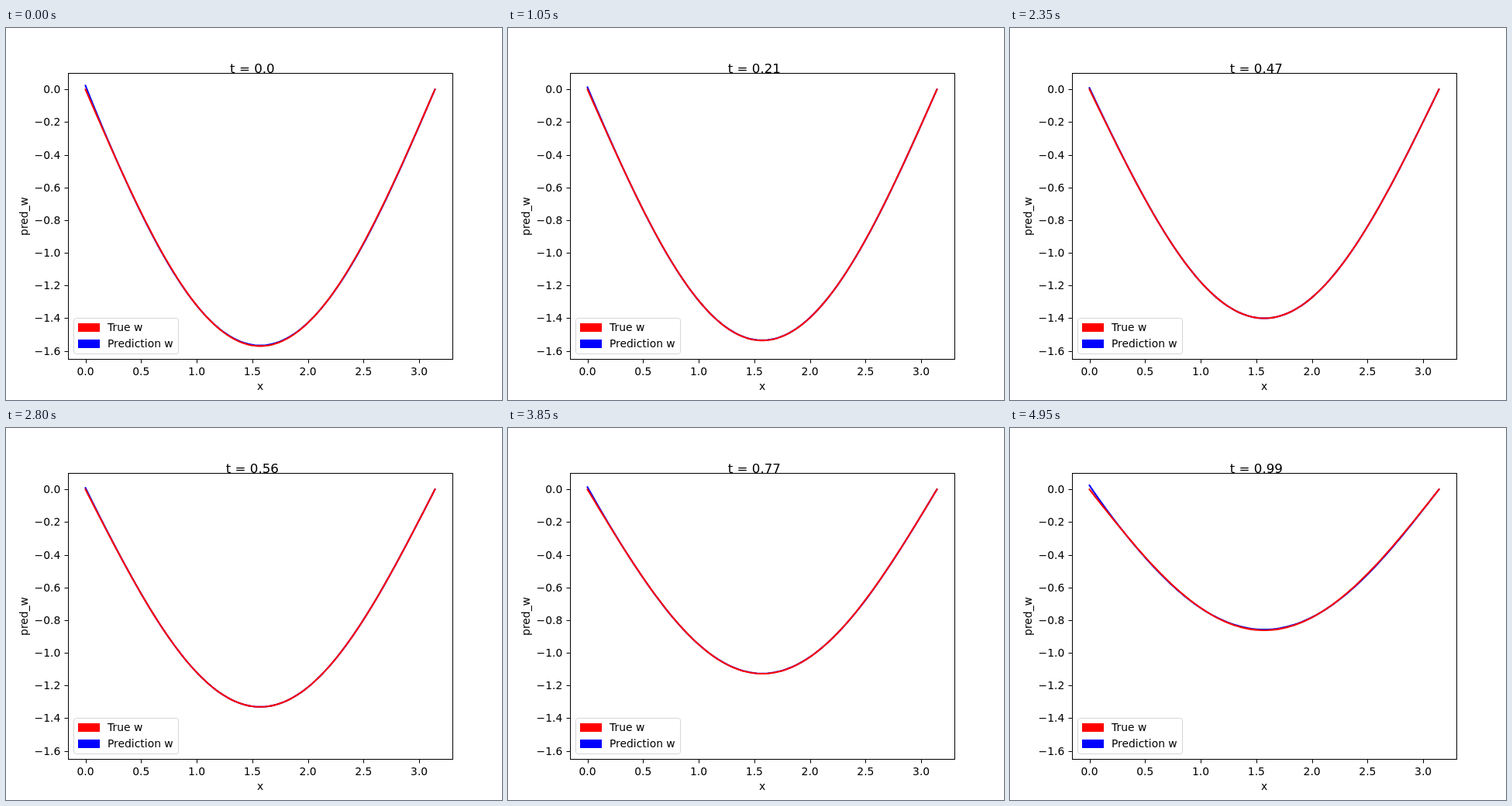
Write an HTML page with a canvas that moves like this. It is 640x480 px and loops after 5 s.

```html
<!DOCTYPE html>
<html lang="en">
<head>
<meta charset="utf-8">
<title>True and predicted w</title>
<style>
  html, body { margin: 0; width: 100%; height: 100%; overflow: hidden; background: #fff; }
  canvas { display: block; }
</style>
</head>
<body>
<canvas id="plot" width="640" height="480"></canvas>
<script>
const ctx = document.getElementById('plot').getContext('2d');
const STEP_MS = 50, STEPS = 100, POINTS = 100;
const SMALL = 13.89, LARGE = 16.67;
const RED = '#ff0000', BLUE = '#0000ff';

const px = x => 102.545 + x * 450.909 / Math.PI;
const py = y => 79.25 - y * 210.85;
const snap = v => Math.floor(v + 0.5) + 0.5;

const trueW = (x, t) => -Math.PI / 2 * Math.cos(t) * Math.sin(x);

// The fit is worst at x = 0 and near both ends of the time range.
function predictedW(x, t) {
  const spread = (t - 0.48) ** 2;
  const edge = (0.009 + 0.06 * spread) * Math.exp(-x / 0.17);
  const ripple = 0.018 * spread * Math.sin(3 * x);
  return trueW(x, t) + edge - ripple;
}

function text(str, x, y, size = SMALL, align = 'center') {
  ctx.font = `${size}px "DejaVu Sans", sans-serif`;
  ctx.textAlign = align;
  ctx.fillStyle = '#000';
  ctx.fillText(str, x, y);
}

function line(x1, y1, x2, y2) {
  ctx.beginPath();
  ctx.moveTo(x1, y1);
  ctx.lineTo(x2, y2);
  ctx.stroke();
}

function curve(f, t, color) {
  ctx.beginPath();
  for (let i = 0; i < POINTS; i++) {
    const x = Math.PI * i / (POINTS - 1);
    ctx.lineTo(px(x), py(f(x, t)));
  }
  ctx.strokeStyle = color;
  ctx.lineWidth = 2.08;
  ctx.lineCap = 'square';
  ctx.lineJoin = 'round';
  ctx.stroke();
}

function axes() {
  ctx.strokeStyle = '#000';
  ctx.lineWidth = 1;
  ctx.lineCap = 'butt';
  ctx.lineJoin = 'miter';
  ctx.strokeRect(80.5, 58.5, 496, 369);
  for (let i = 0; i <= 6; i++) {
    const x = px(i / 2);
    line(snap(x), 428, snap(x), 432.5);
    text((i / 2).toFixed(1), x, 448);
  }
  for (let i = 0; i <= 8; i++) {
    const y = py(-i / 5);
    line(75.5, snap(y), 80, snap(y));
    text((i ? '\u2212' : '') + (i / 5).toFixed(1), 70.3, Math.round(y + 5), SMALL, 'right');
  }
  text('x', 328, 467);
  ctx.save();
  ctx.translate(28, 243);
  ctx.rotate(-Math.PI / 2);
  text('pred_w', 0, 0);
  ctx.restore();
}

function legend() {
  ctx.beginPath();
  ctx.roundRect(87.5, 374.5, 135, 46, 2.8);
  ctx.fillStyle = 'rgba(255,255,255,0.8)';
  ctx.fill();
  ctx.strokeStyle = 'rgba(204,204,204,0.8)';
  ctx.lineWidth = 1;
  ctx.stroke();
  [['True w', RED, 381], ['Prediction w', BLUE, 402]].forEach(([label, color, y]) => {
    ctx.fillStyle = color;
    ctx.fillRect(93, y, 28, 11);
    text(label, 131, y + 10, SMALL, 'left');
  });
}

function draw(now) {
  const step = Math.floor(now / STEP_MS) % STEPS;
  const t = step / STEPS;
  ctx.fillStyle = '#fff';
  ctx.fillRect(0, 0, 640, 480);
  curve(predictedW, t, BLUE);
  curve(trueW, t, RED);
  axes();
  text('t = ' + (step ? String(t) : '0.0'), px(1.5), 58, LARGE);
  legend();
}

function tick() {
  draw(performance.now());
  requestAnimationFrame(tick);
}
tick();
</script>
</body>
</html>
```
